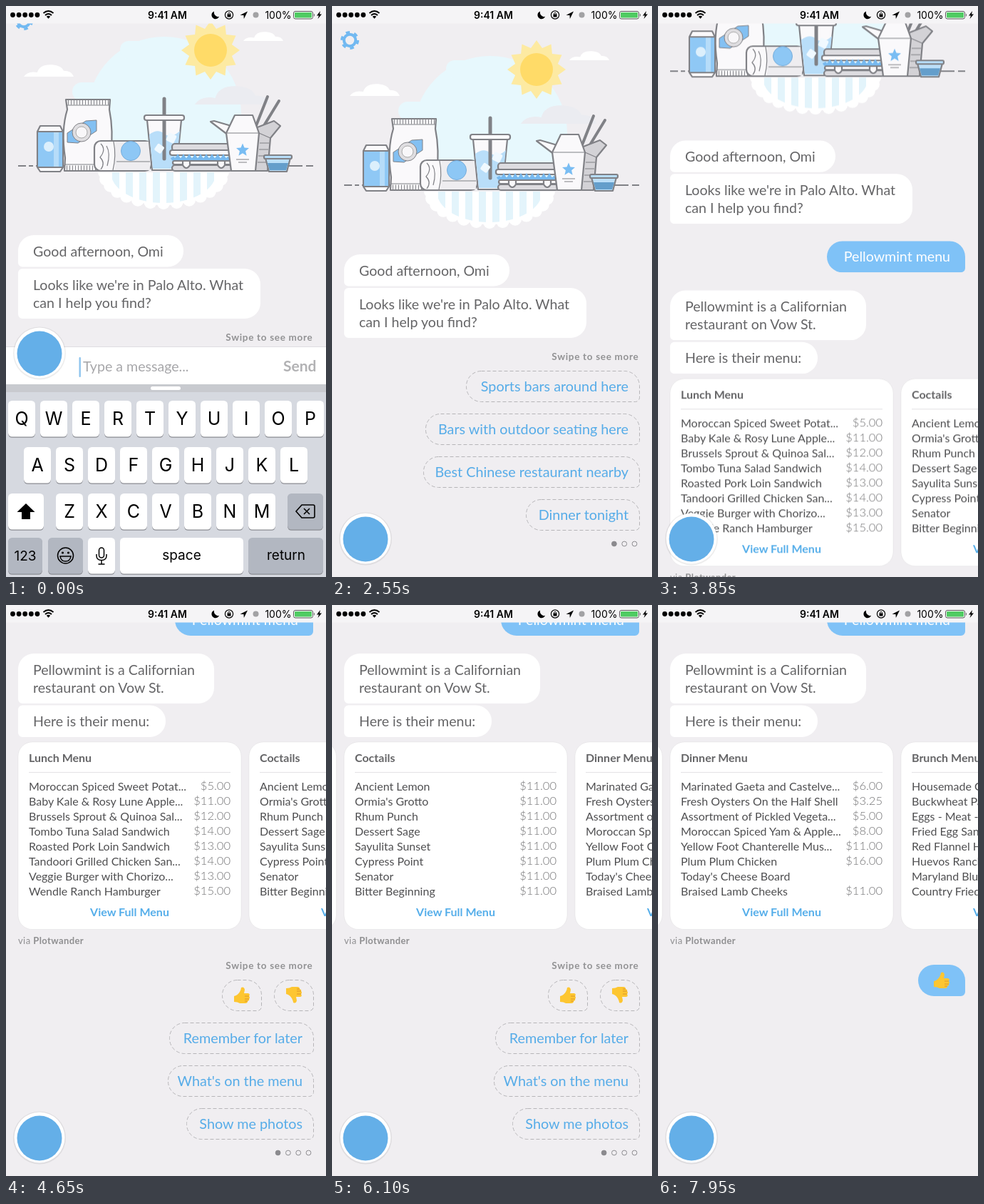
Recreate the animation shown at these times as an HTML page. Size 449x800 px, loop 8 s.

```html
<!DOCTYPE html>
<html lang="en">
<head>
<meta charset="utf-8">
<title>Chat assistant</title>
<style>
html, body { margin: 0; width: 100%; height: 100%; overflow: hidden; background: #f0eef1; }
svg { display: block; width: 449px; height: 800px; }
text { font-family: Lato, sans-serif; font-size: 19.6px; fill: #656567; }
.ui, .ui text { font-family: Inter, sans-serif; fill: #000; }
.key { font-size: 25px; text-anchor: middle; }
.word { font-size: 19px; text-anchor: middle; }
.end { text-anchor: end; }
.chip { font-size: 19.8px; fill: #56ace8; text-anchor: end; }
.hint { font-size: 13.5px; font-weight: 700; letter-spacing: .7px; fill: #929294; text-anchor: end; }
.item { font-size: 16px; fill: #4f4f51; }
.price { font-size: 16.5px; font-weight: 300; fill: #717173; text-anchor: end; }
.title { font-size: 16px; font-weight: 700; }
.link { font-size: 16px; font-weight: 700; fill: #55aeea; text-anchor: middle; }
.via { font-size: 13px; fill: #8e8e90; letter-spacing: .4px; }
.dash { fill: none; stroke: #b6b5b8; stroke-dasharray: 5 3; }
.ink { stroke: #808186; stroke-width: 2.2; stroke-linejoin: round; stroke-linecap: round; fill: #faf9fb; }
.thin { stroke: #808186; stroke-width: 1.2; fill: none; }
#typed { white-space: pre; fill: #202022; }

.move { animation: 8s linear infinite both; }
#page { animation-name: page; }
#keyboard { animation-name: keyboard; }
#mascot { animation-name: mascot; }
#ideas { animation-name: ideas; }
#asked { animation-name: asked; }
#reply1 { animation-name: reply1; }
#reply2 { animation-name: reply2; }
#menus { animation-name: menus; }
#cards { animation-name: cards; }
#followups { animation-name: followups; }
#liked { animation-name: liked; }
@keyframes page {
  0%, 28.75% { transform: translateY(-27px); animation-timing-function: ease-out; }
  31.75% { transform: none; }
  44.92% { transform: none; animation-timing-function: ease-in-out; }
  53.04%, 100% { transform: translateY(-490px); }
}
@keyframes keyboard {
  0%, 28.75% { transform: none; animation-timing-function: ease-out; }
  31.75%, 100% { transform: translateY(330px); }
}
@keyframes mascot {
  0%, 28.75% { transform: none; animation-timing-function: ease-out; }
  31.75%, 100% { transform: translateY(260px); }
}
@keyframes ideas { 0%, 32.2% { opacity: 1; } 35%, 100% { opacity: 0; } }
@keyframes asked {
  0%, 33.75% { opacity: 0; transform: translateY(30px); animation-timing-function: ease-out; }
  36.9%, 100% { opacity: 1; transform: none; }
}
@keyframes reply1 { 0%, 40.5% { opacity: 0; } 42.5%, 100% { opacity: 1; } }
@keyframes reply2 { 0%, 41.8% { opacity: 0; } 43.8%, 100% { opacity: 1; } }
@keyframes menus { 0%, 43.1% { opacity: 0; } 45%, 100% { opacity: 1; } }
@keyframes cards {
  0%, 61.875% { transform: none; animation-timing-function: cubic-bezier(.3, .1, .2, 1); }
  70% { transform: translateX(-324px); }
  76.875% { transform: translateX(-324px); animation-timing-function: cubic-bezier(.3, .1, .2, 1); }
  85%, 100% { transform: translateX(-648px); }
}
@keyframes followups { 0%, 53.75% { opacity: 0; } 56.9%, 95.9% { opacity: 1; } 98.5%, 100% { opacity: 0; } }
@keyframes liked {
  0%, 96% { opacity: 0; transform: translate(-67px, 21px); animation-timing-function: ease-out; }
  99.2%, 100% { opacity: 1; transform: none; }
}
</style>
</head>
<body>
<svg id="stage" viewBox="0 0 449 800"></svg>
<script>
const range = n => [...Array(n).keys()];
const text = (x, y, cls, s) => `<text x="${x}" y="${y}" class="${cls}">${s}</text>`;
const rect = (x, y, w, h, r, attrs) => `<rect x="${x}" y="${y}" width="${w}" height="${h}" rx="${r}" ${attrs}/>`;
const circle = (x, y, r, attrs) => `<circle cx="${x}" cy="${y}" r="${r}" ${attrs}/>`;
const path = (d, attrs = 'class="ink"') => `<path d="${d}" ${attrs}/>`;
const at = (x, y, body) => `<g transform="translate(${x} ${y})">${body}</g>`;
const move = (id, body) => `<g id="${id}" class="move">${body}</g>`;

// Rounded box with its own radius per corner: top-left, top-right, bottom-right, bottom-left.
const box = (x, y, w, h, [a, b, c, d], attrs) => path(
  `M${x + a} ${y}h${w - a - b}a${b} ${b} 0 0 1 ${b} ${b}v${h - b - c}a${c} ${c} 0 0 1 ${-c} ${c}` +
  `h${c + d - w}a${d} ${d} 0 0 1 ${-d} ${-d}v${a + d - h}a${a} ${a} 0 0 1 ${a} ${-a}z`, attrs);

const star = (x, y, points, outer, inner, fill) => {
  const pts = range(points * 2).map(i => {
    const r = i % 2 ? inner : outer, a = i * Math.PI / points - Math.PI / 2;
    return `${(x + r * Math.cos(a)).toFixed(1)},${(y + r * Math.sin(a)).toFixed(1)}`;
  });
  return `<polygon points="${pts.join(' ')}" fill="${fill}"/>`;
};

const says = (y, w, lines, first) =>
  box(17, y, w, lines.length * 25.5 + 19, [first ? 22 : 6, 22, 22, 6], 'fill="#fff"') +
  lines.map((s, i) => text(38, y + 29.5 + i * 25.5, '', s)).join('');
const chip = (left, y, s) =>
  box(left, y, 431.5 - left, 43, [21, 21, 6, 21], 'class="dash"') + text(416, y + 28.5, 'chip', s);
const dots = (n, y) => range(n).map(i => circle(424.5 - 14.3 * (n - 1 - i), y, 3.4,
  `stroke="#8b8a8e" fill="${i ? 'none' : '#8b8a8e'}"`)).join('');

const thumb = (x, y, flip = 1) => `<g transform="translate(${x} ${y}) scale(1 ${flip})">` +
  path('M-11 1Q-6 0-3-5Q-1-9-1-11Q3-13 4-8L3-3H9Q12-2 10 1Q12 3 10 5Q11 7 8 8Q8 11 5 11H-3Q-6 9-11 9z', 'fill="#fdc631"') +
  path('M4 1h6M4 5h6M4 8h4', 'stroke="#dd962a" fill="none"') + '</g>';

const cloud = (x, y, w, h, fill) => path(
  `M${x} ${y}q${w * .08} ${-h * .5} ${w * .27} ${-h * .35}q${w * .05} ${-h * .7} ${w * .3} ${-h * .63}` +
  `q${w * .19} ${h * .06} ${w * .23} ${h * .5}q${w * .16} 0 ${w * .2} ${h * .48}z`, `fill="${fill}"`);

function picnic() {
  const sky = '<clipPath id="above"><path d="M0 0H449V226H0z"/></clipPath><g clip-path="url(#above)" fill="#e7f8fd">' +
    circle(222, 151, 108, '') + rect(160, 49, 108, 25, 12, '') + rect(93, 107, 90, 26, 13, '') + '</g>';
  const rim = range(15).map(i => {
    const a = Math.PI * i / 14;
    return circle(221 + 83 * Math.cos(a), 233 + 43 * Math.sin(a), 9, 'fill="#fff"');
  }).join('');
  const plate = '<clipPath id="below"><path d="M0 233H449V300H0z"/></clipPath><g clip-path="url(#below)">' + rim +
    '<ellipse cx="221" cy="233" rx="84" ry="46" fill="#fff"/>' +
    '<clipPath id="cloth"><ellipse cx="221" cy="233" rx="74" ry="43"/></clipPath><g clip-path="url(#cloth)">' +
    range(8).map(i => rect(149 + i * 19, 233, 10, 48, 0, 'fill="#e3f4fb"')).join('') + '</g></g>';
  const can = path('M48 168H76L80 176V226L76 232H48L44 226V176z') +
    rect(45, 176, 34, 50, 0, 'fill="#8fc8f5"') + rect(67, 176, 7, 50, 0, 'fill="#b6dcf9"') +
    path('M44 176H80M44 226H80', 'class="ink"') + circle(60, 197, 7, 'fill="#dceffc"');
  const bag = path('M84 131H146L145 145Q151 174 147 211L148 231H82L83 213Q77 174 86 145z') +
    path('M85 139H146M83 222H147', 'class="thin"') +
    path('M87 135H145M85 227H146', 'class="thin" style="stroke-width:7;stroke-dasharray:1 3"') +
    path('M86 178L112 161L127 160V175L101 192L86 191z', 'fill="#83c0f2" stroke="#808186"') +
    circle(106, 177, 13, 'fill="#dfdee1" stroke="#808186"') + circle(106, 177, 8, 'fill="#f8f7f9" stroke="#aaa"');
  const wrap = rect(124, 189, 80, 42, 9, 'class="ink"') + rect(153, 190, 49, 40, 0, 'fill="#eeedf0"') +
    circle(175, 203, 13.5, 'fill="#8dc7f5" stroke="#77addb"') +
    path('M151 190Q155 210 150 230M133 193Q141 201 132 212Q140 220 133 229M141 196Q147 206 142 224M155 218H202', 'class="thin"');
  const cup = path('M198 160H246L239 230H205z') +
    path('M201 180Q213 171 222 179T244 175L238 228H206z', 'fill="#b9def9"') +
    path('M222 130V214', 'class="ink" style="stroke-width:5"') +
    rect(-6, -6, 12, 12, 2, 'fill="#f0f9ff" transform="translate(232 185) rotate(25)"') +
    rect(-5, -5, 11, 11, 2, 'fill="#f0f9ff" transform="translate(215 199) rotate(35)"') +
    rect(194, 153, 56, 7, 3, 'class="ink"');
  const sandwich = rect(233, 193, 85, 10, 4, 'class="ink" style="fill:#dddce0"') + rect(230, 202, 91, 7, 3, 'class="ink"') +
    path('M233 212' + 'q4 7 8 0'.repeat(10), 'stroke="#77b9ef" stroke-width="5" fill="none"') +
    rect(233, 223, 85, 8, 4, 'class="ink" style="fill:#dddce0"') + rect(234, 217, 82, 5, 2.5, 'class="ink"') +
    path('M248 218V223Q253 231 258 223V218M297 218V223Q302 231 307 223V218');
  const takeout = path('M350 170L367 127M358 174L383 133', 'class="ink" style="stroke-width:4"') +
    path('M350 171L376 161L385 168L371 185L367 231H347z', 'class="ink" style="fill:#d3d2d6"') +
    path('M312 181L287 162L292 161L316 168z') + path('M309 178L321 153H346L355 178L350 231H316z') +
    path('M310 178H354M355 178L371 185M356 192h13M355 201h13M354 210h13M353 219h13', 'class="thin"') +
    star(332, 202, 5, 9.5, 4.3, '#79bdf3') + path('M323 215H341M326 219H338', 'class="thin"');
  const sauce = path('M364 213H399L394 232H369z', 'class="ink" style="fill:#bcdff8"') +
    path('M367 220H396L393 230H370z', 'fill="#649ecb"') + rect(362, 209, 39, 5, 2, 'class="ink" style="fill:#b6dcf7"');
  return sky + cloud(25, 99, 70, 17, '#fff') + cloud(333, 49, 56, 13, '#fff') + cloud(265, 138, 106, 26, '#ebecf1') +
    star(287, 62, 12, 41, 31, '#fdeaa2') + circle(287, 62, 23, 'fill="#ffdb68"') + plate +
    path('M17 224H28M32 224H38M42 224H416M421 224H431', 'class="thin" style="stroke-width:2"') +
    bag + can + wrap + cup + sandwich + takeout + sauce;
}

const gear = circle(25, 48, 8.2, 'fill="none" stroke="#72b9f1" stroke-width="4"') +
  circle(25, 48, 11.3, 'fill="none" stroke="#72b9f1" stroke-width="3.5" stroke-dasharray="5.5 6.333"');

const menuData = [
  ['Lunch Menu', 'Moroccan Spiced Sweet Potat...|Baby Kale &amp; Rosy Lune Apple...|Brussels Sprout &amp; Quinoa Sal...|Tombo Tuna Salad Sandwich|Roasted Pork Loin Sandwich|Tandoori Grilled Chicken San...|Veggie Burger with Chorizo...|Wendle Ranch Hamburger',
    '5.00|11.00|12.00|14.00|13.00|14.00|13.00|15.00'],
  ['Coctails', "Ancient Lemon|Ormia's Grotto|Rhum Punch|Dessert Sage|Sayulita Sunset|Cypress Point|Senator|Bitter Beginning",
    Array(8).fill('11.00').join('|')],
  ['Dinner Menu', "Marinated Gaeta and Castelve...|Fresh Oysters On the Half Shell|Assortment of Pickled Vegeta...|Moroccan Spiced Yam &amp; Apple...|Yellow Foot Chanterelle Mus...|Plum Plum Chicken|Today's Cheese Board|Braised Lamb Cheeks",
    '6.00|3.25|5.00|8.00|11.00|16.00||11.00'],
  ['Brunch Menu', 'Housemade Granola|Buckwheat Pancakes|Eggs - Meat - Toast|Fried Egg Sandwich|Red Flannel Hash|Huevos Rancheros|Maryland Blue Crab|Country Fried Steak', '']
];
const card = ([title, items, prices], i) => at(324 * i, 0,
  rect(17, 192, 313, 262.5, 20, 'fill="#fff" stroke="#000" stroke-opacity=".05"') +
  text(32, 220, 'title', title) + path('M32 234.5H315', 'stroke="#e3e2e5"') +
  items.split('|').map((s, n) => text(32, 260 + n * 21, 'item', s)).join('') +
  prices.split('|').map((s, n) => s && text(315, 258.5 + n * 21, 'price', '$' + s)).join('') +
  text(173.5, 435.5, 'link', 'View Full Menu'));

const page = gear + at(0, 27, picnic()) +
  says(348, 232, ['Good afternoon, Omi'], true) +
  says(395, 340, ["Looks like we're in Palo Alto. What", 'can I help you find?']) +
  move('ideas', text(430.5, 496, 'hint', 'Swipe to see more') +
    chip(188.5, 511.5, 'Sports bars around here') + chip(131.5, 571.5, 'Bars with outdoor seating here') +
    chip(128.5, 631.5, 'Best Chinese restaurant nearby') + chip(272.5, 691.5, 'Dinner tonight') + dots(3, 753.5)) +
  at(0, 490,
    move('asked', box(237, -1, 194, 44, [22, 22, 6, 22], 'fill="#7fc2f7"') +
      '<text x="410" y="28" class="end" style="fill:#fff">Pellowmint menu</text>') +
    move('reply1', says(68, 275, ['Pellowmint is a Californian', 'restaurant on Vow St.'], true)) +
    move('reply2', says(140.5, 207, ['Here is their menu:'])) +
    move('menus', move('cards', menuData.map(card).join('')) +
      text(17, 475, 'via', 'via <tspan font-weight="700">Plotwander</tspan>')) +
    move('followups', text(430.5, 510, 'hint', 'Swipe to see more') +
      box(303.5, 525.5, 55, 43, [21, 21, 6, 21], 'class="dash"') + thumb(331, 547) +
      box(376.5, 525.5, 55, 43, [21, 21, 6, 21], 'class="dash"') + thumb(404, 546, -1) +
      chip(229.5, 585.5, 'Remember for later') + chip(227.5, 645.5, "What's on the menu") +
      chip(253.5, 705.5, 'Show me photos') + dots(4, 767.5)) +
    move('liked', box(365, 504, 66, 44, [22, 22, 6, 22], 'fill="#7fc2f7"') + thumb(398, 526)));

const cap = (x, y, w, fill = '#fff') => rect(x, y + 1.3, w, 50.5, 5.5, 'fill="#8b8d93"') + rect(x, y, w, 50.5, 5.5, `fill="${fill}"`);
const letters = [['QWERTYUIOP', 22, 553], ['ASDFGHJKL', 44, 618], ['ZXCVBNM', 89, 683]];
const grey = '#b2b7c1';
const arrow = 'M28 697L40.5 709H34V719H22V709H15.5z';
const keys = rect(0, 530, 449, 270, 0, 'fill="#d6d9e0"') + rect(0, 530, 449, 11, 0, 'fill="#c8cacf"') +
  rect(203, 533, 42, 5, 2.5, 'fill="#fff"') +
  letters.map(([row, x, y]) => [...row].map((c, i) =>
    cap(x + 45 * i - 19, y, 38) + text(x + 45 * i, y + 34, 'key letter', c)).join('')).join('') +
  `<g id="shiftOn">${cap(3, 683, 50)}${path(arrow, 'fill="#000"')}</g>` +
  `<g id="shiftOff">${cap(3, 683, 50, grey)}${path(arrow, 'fill="none" stroke="#000" stroke-width="1.6" stroke-linejoin="round"')}</g>` +
  cap(395, 683, 50, grey) + path('M407 708L415 699H431Q433 699 433 701V715Q433 717 431 717H415zM418 704l8 8m0-8l-8 8', 'fill="none" stroke="#000" stroke-width="1.6"') +
  cap(3, 745, 48, grey) + text(27, 777, 'word', '123') + cap(59, 745, 49, grey) +
  circle(83.5, 770, 11, 'fill="none" stroke="#000" stroke-width="1.5"') + circle(79.5, 766, 1.6, '') + circle(87.5, 766, 1.6, '') +
  path('M76 771H91Q90 778 83.5 778T76 771z', 'fill="none" stroke="#000" stroke-width="1.5"') +
  cap(115, 745, 38) + rect(130.5, 759, 7, 14, 3.5, 'fill="none" stroke="#000" stroke-width="1.5"') +
  path('M127 768V770Q127 776.5 134 776.5T141 770V768M134 777V782M129.5 782H138.5', 'fill="none" stroke="#000" stroke-width="1.5"') +
  cap(160, 745, 173) + text(246.5, 776, 'word', 'space') + cap(340, 745, 105, grey) + text(393, 776, 'word', 'return');

const keyboard = rect(0, 477, 449, 53, 0, 'fill="#fff"') + path('M0 477.5H449', 'stroke="#dfdde1"') +
  '<text id="prompt" x="108" y="512" style="fill:#a7a7aa">Type a message...</text><text id="typed" x="103" y="513"></text>' +
  rect(102.5, 492, 2.4, 28, 1, 'id="caret" fill="#8ec4ee"') +
  '<text id="send" x="435.5" y="512" class="end" style="font-size:21px;font-weight:700">Send</text>' +
  `<g class="ui">${keys}</g>`;

const mascot = circle(47, 486.5, 37, 'fill="#000" opacity=".07"') + circle(47, 486, 35.5, 'fill="#fff"') +
  circle(47, 487, 31.5, 'fill="#64afe8"');

const status = rect(0, 0, 449, 24.5, 0, 'fill="#f5f4f6"') + '<g class="ui">' +
  range(5).map(i => circle(9.5 + 8.6 * i, 12.5, 3.4, '')).join('') +
  path('M52.5 10Q59.5 4 66.5 10M55 13Q59.5 9 64 13', 'fill="none" stroke="#000" stroke-width="2"') +
  path('M56.8 14.8Q59.5 12.5 62.2 14.8L59.5 17.7z', 'fill="#000"') +
  '<text x="226.5" y="17.5" text-anchor="middle" style="font-size:14px;font-weight:600">9:41 AM</text>' +
  path('M292 7.5A5.5 5.5 0 1 0 299 14.8A6 6 0 0 1 292 7.5z', 'fill="#000"') +
  circle(313, 12.5, 5.6, 'fill="none" stroke="#000" stroke-width="1.2"') + rect(310.5, 11.5, 5, 4, .5, '') +
  path('M311.5 12V10.5Q313 8 314.5 10.5V12', 'fill="none" stroke="#000"') +
  path('M339 7.5L328.5 12.8L333.5 13L333.8 18z', 'fill="#000"') + circle(350.5, 12.5, 4, 'fill="#a2a2a4"') +
  '<text x="400.5" y="17.5" class="end" style="font-size:14px">100%</text>' +
  rect(403.5, 7.5, 27, 10.5, 2.5, 'fill="#fff" stroke="#555"') + rect(405, 9, 24, 7.5, 1, 'fill="#4fcb62"') +
  path('M432 10.5Q434 12.5 432 15z', 'fill="#555"') + path('M441 7L436 13.5H439L437.5 18L443 11.5H440z', 'fill="#000"') + '</g>';

const stage = document.getElementById('stage');
stage.innerHTML = move('page', page) + move('keyboard', keyboard) + move('mascot', mascot) + status;

const el = id => document.getElementById(id);
const typed = el('typed'), caret = el('caret'), send = el('send');
const message = 'Pellowmint menu';
const clock = el('page').getAnimations()[0];
let shown = -1;

function draw() {
  const t = (clock.currentTime || 0) % 8000;
  const count = Math.max(0, Math.min(message.length, Math.floor((t - 400) / 108) + 1));
  if (count !== shown) {
    shown = count;
    typed.textContent = message.slice(0, count);
    caret.setAttribute('x', count ? 103 + typed.getComputedTextLength() : 102.5);
    el('prompt').style.opacity = count ? 0 : 1;
    el('shiftOn').style.opacity = count ? 0 : 1;
    el('shiftOff').style.opacity = count ? 1 : 0;
    document.querySelectorAll('.letter').forEach(k => {
      k.textContent = count ? k.textContent.toLowerCase() : k.textContent.toUpperCase();
    });
  }
  send.style.fill = !count ? '#b2b2b4' : t < 2150 ? '#69b6f0' : '#d7ebfa';
  requestAnimationFrame(draw);
}
draw();
</script>
</body>
</html>
```
